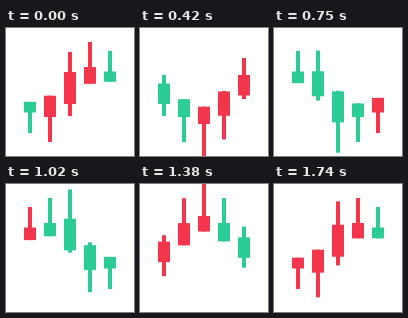
An HTML page for the animation above (1.77 s loop, 128x128 px).

```html
<!DOCTYPE html>
<html lang="en">
<head>
<meta charset="utf-8">
<title>Candlestick loader</title>
<style>
  html, body { margin: 0; width: 100%; height: 100%; overflow: hidden; background: #fff; }
  svg { display: block; width: 100vw; height: 100vh; }
</style>
</head>
<body>
<svg id="stage" viewBox="0 0 128 128"></svg>
<script>
const GREEN = "#2ccd95", RED = "#f4364c";
const STEP = 30, STEPS = 59, DEG_PER_STEP = 6, LAG = 48;
const SKIP_AT = 19; // the 60-step cycle drops one step here
const MID = 64, BIAS = -0.02, KNEE = 0.16;
const SIZES = [20.5, 25, 32, 25, 20.5];

const stage = document.getElementById("stage");

function addRect(x, width) {
  const rect = document.createElementNS("http://www.w3.org/2000/svg", "rect");
  rect.setAttribute("x", x);
  rect.setAttribute("width", width);
  stage.appendChild(rect);
  return rect;
}

const candles = SIZES.map((size, i) => ({
  size,
  lag: i * LAG,
  wick: addRect(22 + 20 * i, 4),
  body: addRect(18 + 20 * i, 12)
}));

// Limits a value to -1..1 with a slightly rounded corner.
function softClamp(v) {
  const a = Math.abs(v);
  if (a <= 1 - KNEE) return v;
  const gap = Math.max(0, 1 + KNEE - a);
  return Math.sign(v) * (1 - gap * gap / (4 * KNEE));
}

function place(rect, top, bottom, color) {
  rect.setAttribute("y", MID + top);
  rect.setAttribute("height", bottom - top);
  rect.setAttribute("fill", color);
}

function draw(ms) {
  const step = Math.floor((ms % (STEP * STEPS)) / STEP);
  const angle = DEG_PER_STEP * (step + (step >= SKIP_AT ? 1 : 0));
  for (const { size, lag, wick, body } of candles) {
    const phase = (angle - lag + 360) % 360;
    const center = Math.cos(phase * Math.PI / 180) + BIAS;
    const top = size * softClamp(center - 0.5);
    const bottom = size * softClamp(center + 0.5);
    const color = phase < 180 ? GREEN : RED;
    place(body, top, bottom, color);
    place(wick, Math.min(top, 2 * top), Math.max(bottom, 2 * bottom), color);
  }
}

const start = performance.now();
function tick() {
  draw(performance.now() - start);
  requestAnimationFrame(tick);
}
draw(0);
requestAnimationFrame(tick);
</script>
</body>
</html>
```
